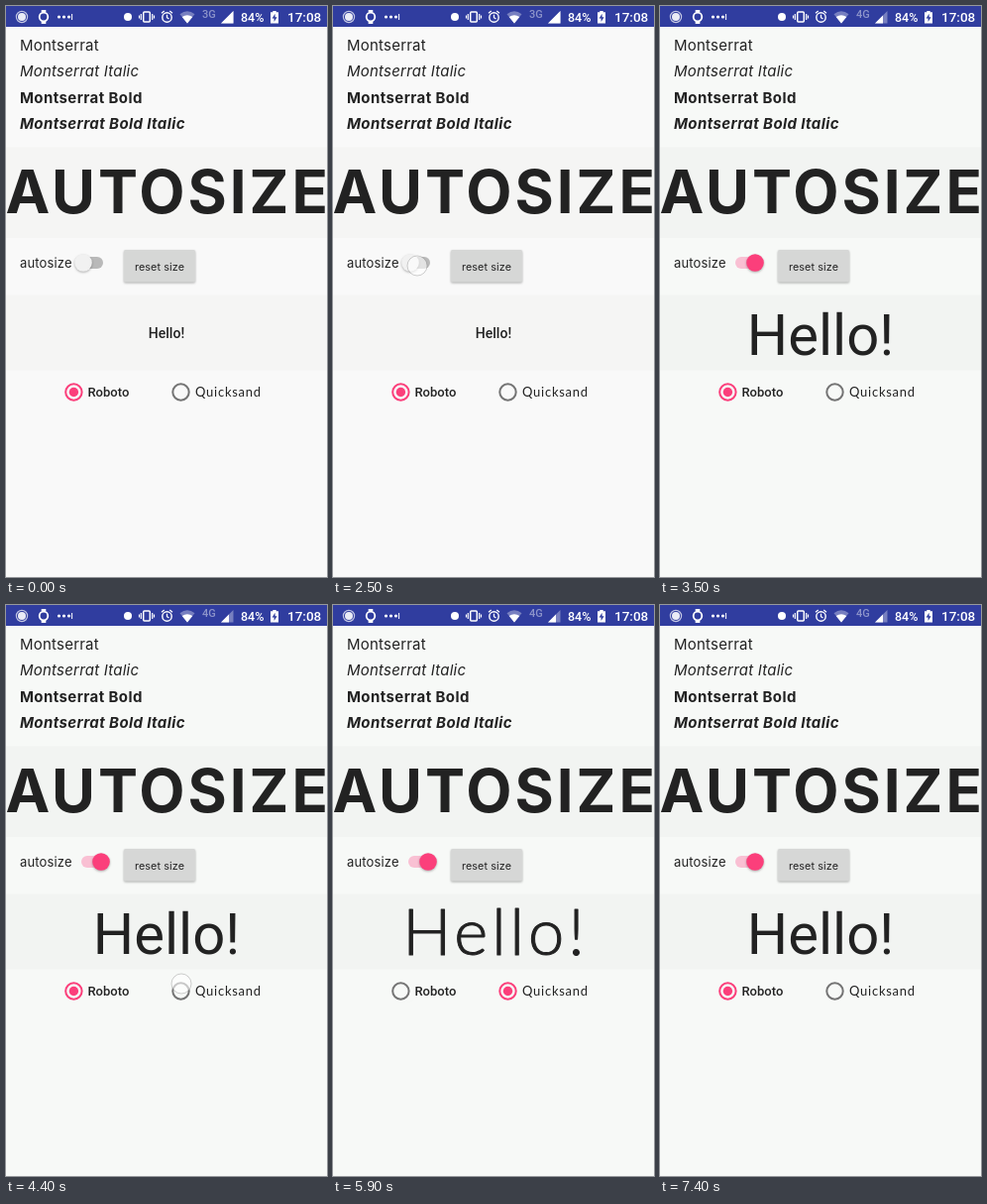
These frames come from a looping animation (324x576 px, 8 s). An HTML page:

```html
<!DOCTYPE html>
<html lang="en">
<head>
<meta charset="utf-8">
<title>Autosize text</title>
<style>
  html, body { margin: 0; width: 100%; height: 100%; overflow: hidden; }
  svg { display: block; width: 100vw; height: 100vh; font-optical-sizing: none; }
  text { font-family: Inter, sans-serif; fill: #222; }
  .roboto { font-family: Roboto, sans-serif; }
  .round { font-family: Lato, sans-serif; }
  .status text { font-family: Roboto, sans-serif; fill: #fff; font-weight: 500; }
  .raised { filter: drop-shadow(0 1px 1px rgba(0, 0, 0, .3)); }
</style>
</head>
<body>
<svg viewBox="0 0 324 576">
  <rect id="page" width="324" height="576"/>
  <g id="bands">
    <rect y="142.5" width="324" height="91.5"/>
    <rect y="291.5" width="324" height="76"/>
  </g>

  <g class="status" fill="none" stroke="#fff">
    <rect width="324" height="21" fill="#303d9f" stroke="none"/>
    <circle cx="16" cy="11" r="5.6" stroke-width="1.2" stroke-opacity=".7"/>
    <circle cx="16" cy="11" r="4" fill="#fff" fill-opacity=".9" stroke="none"/>
    <circle cx="38" cy="11" r="4.3" stroke-width="1.8"/>
    <path d="M35.7 5.2h4.6M35.7 16.8h4.6" stroke-width="2.6"/>
    <path d="M53.5 11h0M58.5 11h0M63.5 11h0" stroke-width="3.2" stroke-linecap="round"/>
    <path d="M66.6 8v6"/>
    <circle cx="123" cy="11" r="4" fill="#fff" stroke="none"/>
    <rect x="138.7" y="6" width="6.6" height="10" rx="1" stroke-width="1.5"/>
    <path d="M136.3 8v6M134.5 9.5v3M147.7 8v6M149.5 9.5v3" stroke-width="1.2"/>
    <circle cx="162.5" cy="11.5" r="4.7" stroke-width="1.4"/>
    <path d="M162.5 8.7v3l2 1.4M157 7.2l2.7-2.2M168 7.2l-2.7-2.2" stroke-width="1.2"/>
    <g fill="#fff" stroke="none">
      <path d="M175.5 8.2q7.5-5.8 15 0L183 17.5z" opacity=".35"/>
      <path d="M177.7 11q5.3-3.6 10.6 0L183 17.5z"/>
      <text id="network" x="198" y="11.7" font-size="11" opacity=".45"></text>
      <path d="M217 17.5h12.5v-12.5z" opacity=".35"/>
      <path id="signal"/>
      <text x="237" y="15.5" font-size="12.5">84%</text>
      <path d="M269.3 5h3.4v1.3h2.3v11.2h-8v-11.2h2.3z"/>
      <path d="M271.6 7.8l-3 4.7h2v3.5l3-4.8h-2z" fill="#303d9f"/>
      <text x="284" y="15.8" font-size="13.5">17:08</text>
    </g>
  </g>

  <g font-size="15" letter-spacing=".22">
    <text x="14" y="44.5">Montserrat</text>
    <text x="14" y="71" font-style="italic">Montserrat Italic</text>
    <g font-weight="700" letter-spacing=".4">
      <text x="14" y="97.5">Montserrat Bold</text>
      <text x="14" y="124" font-style="italic">Montserrat Bold Italic</text>
    </g>
  </g>
  <text x="-.5" y="209" font-size="60" font-weight="750" letter-spacing="3">AUTOSIZE</text>

  <text x="14" y="263.5" font-size="13" letter-spacing=".15">autosize</text>
  <rect id="track" x="76" y="253" width="22" height="12" rx="6"/>
  <circle id="ripple" fill="#fb3f7b"/>
  <circle id="thumb" class="raised" cy="259" r="8.8"/>
  <rect class="raised" x="119" y="246" width="72" height="32.5" rx="1.5" fill="#d6d7d6"/>
  <text x="155" y="266.5" font-size="10.8" letter-spacing=".1" text-anchor="middle">reset size</text>

  <text id="hello" text-anchor="middle" stroke="#222" stroke-linejoin="round">Hello!</text>
  <g id="radios" fill="none">
    <g transform="translate(68.4 389.5)"><circle/><circle/></g>
    <g transform="translate(176.5 389.5)"><circle/><circle/></g>
  </g>
  <text class="roboto" x="82.5" y="394" font-size="13" font-weight="500">Roboto</text>
  <text class="round" x="191" y="394" font-size="13" letter-spacing=".75">Quicksand</text>
  <circle id="touch" r="10" fill="#fff" fill-opacity=".6" stroke="#777" stroke-opacity=".35"/>
</svg>
<script>
const LOOP = 8000, PINK = '#fb3f7b', GRAY = '#747474';
const TOGGLE = 2700, TO_QUICKSAND = 4450, TO_ROBOTO = 6200;
const taps = [
  { down: 2450, up: TOGGLE, x: 85, y: 262, rippleX: 96, rippleY: 259 },
  { down: 4200, up: TO_QUICKSAND, x: 177, y: 382, rippleX: 176.5, rippleY: 389.5 },
  { down: 5900, up: TO_ROBOTO, x: 74, y: 391, rippleX: 68.4, rippleY: 389.5 },
];

const $ = id => document.getElementById(id);
const set = (node, attrs) => {
  for (const name in attrs) node.setAttribute(name, attrs[name]);
};
const ramp = (t, start, length) => Math.min(1, Math.max(0, (t - start) / length));
const ease = p => p * p * (3 - 2 * p);

// Turning on, the ring swells before the dot grows; turning off, after it shrinks.
function drawRadio(group, on, age) {
  const [ring, dot] = group.children;
  const color = on ? PINK : GRAY;
  const swellStart = on ? 0 : 150;
  const swell = ease(ramp(age, swellStart, 100)) * (1 - ease(ramp(age, swellStart + 150, 150)));
  const width = 2 + 2.4 * swell;
  const size = on ? ease(ramp(age, 120, 180)) : 1 - ease(ramp(age, 60, 140));
  set(ring, { r: 9.2 - width / 2, stroke: color, 'stroke-width': width });
  set(dot, { r: 4.7 * size, fill: color });
}

function drawHello(t, quicksand) {
  const big = t >= TOGGLE;
  set($('hello'), {
    class: quicksand ? 'round' : 'roboto',
    x: quicksand ? 164 : 162,
    y: quicksand ? 353 : big ? 352 : 334.5,
    'font-size': quicksand ? 65 : big ? 58 : 14,
    'font-weight': quicksand ? 300 : big ? 400 : 500,
    'letter-spacing': quicksand ? 4 : 0,
    'stroke-width': quicksand ? 1 : 0,
  });
}

function drawTap(t) {
  const tap = taps.findLast(({ down }) => t >= down) || taps[0];
  const { x, y, down, up, rippleX, rippleY } = tap;
  set($('touch'), {
    cx: x, cy: y,
    opacity: ramp(t, down, 50) * (1 - ramp(t, up + 80, 100)),
  });
  set($('ripple'), {
    cx: rippleX, cy: rippleY,
    r: 6 + 9 * ease(ramp(t, up, 200)),
    opacity: t < up ? 0 : 0.25 * (1 - ramp(t, up, 340)),
  });
}

function draw(t) {
  const on = t >= TOGGLE;
  const quicksand = t >= TO_QUICKSAND && t < TO_ROBOTO;
  const lastChange = t >= TO_ROBOTO ? TO_ROBOTO : t >= TO_QUICKSAND ? TO_QUICKSAND : -LOOP;
  const later = t >= 2900;

  set($('page'), { fill: later ? '#f7f9f7' : '#f9f9f9' });
  set($('bands'), { fill: later ? '#f2f4f2' : '#f5f5f4' });
  $('network').textContent = later ? '4G' : '3G';
  const level = later ? 8 : 12.5;
  set($('signal'), { d: `M217 17.5h${level}v${-level}z` });

  set($('track'), { fill: on ? '#f9c0d3' : '#b9b9b9' });
  set($('thumb'), { cx: 78 + 18 * ease(ramp(t, TOGGLE, 220)), fill: on ? PINK : '#f1f1f1' });
  drawHello(t, quicksand);
  drawRadio($('radios').children[0], !quicksand, t - lastChange);
  drawRadio($('radios').children[1], quicksand, t - lastChange);
  drawTap(t);
}

function tick() {
  draw(performance.now() % LOOP);
  requestAnimationFrame(tick);
}
tick();
</script>
</body>
</html>
```
